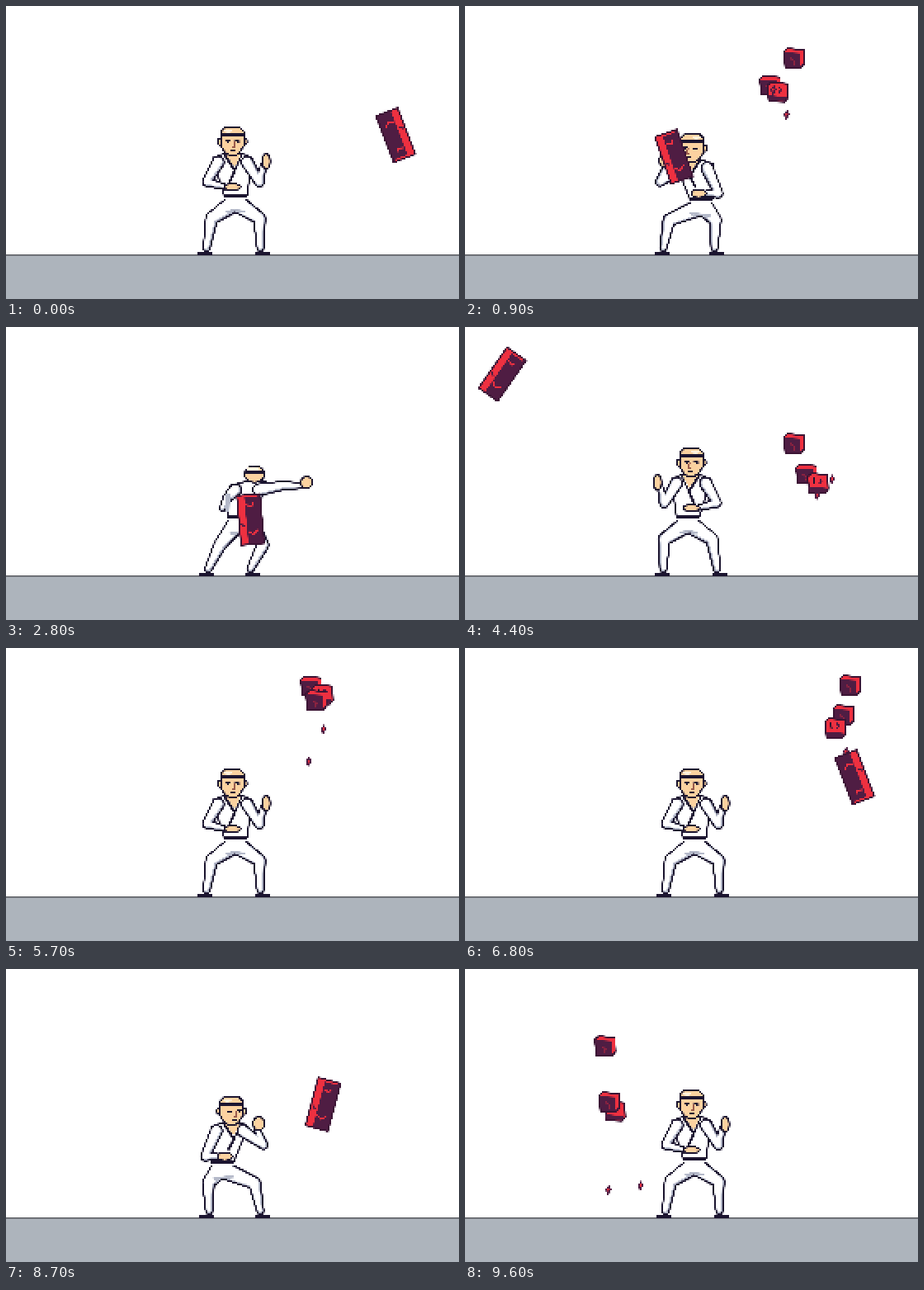
Write an HTML page with a canvas that moves like this. It is 549x355 px and loops after 9.7 s.

```html
<!DOCTYPE html>
<html lang="en">
<head>
<meta charset="utf-8">
<title>Brick breaker</title>
<style>
html, body { margin: 0; width: 100%; height: 100%; overflow: hidden; background: #fff; }
canvas { display: block; width: 549px; height: 355px; }
</style>
</head>
<body>
<canvas id="stage" width="549" height="355"></canvas>
<script>
const INK = '#1c1530', WHITE = '#fff', SKIN = '#fcd2a0', PALE = '#fff3df', SHADE = '#b4b9c9';
const RED = '#ee3040', PLUM = '#4f1d43', EDGE = '#3b1434';
const STEP = 100, STEPS = 97, PIXEL = 2, GRAVITY = 16;

// Shapes are drawn large, then sampled down to hard square pixels.
const stage = document.getElementById('stage').getContext('2d');
const small = new OffscreenCanvas(275, 178).getContext('2d');
const ctx = new OffscreenCanvas(1100, 712).getContext('2d');
stage.imageSmoothingEnabled = small.imageSmoothingEnabled = false;

function trace(points) {
  ctx.beginPath();
  for (let i = 0; i < points.length; i += 2) ctx.lineTo(points[i], points[i + 1]);
}

function line(points, color = INK, width = PIXEL) {
  trace(points);
  ctx.strokeStyle = color;
  ctx.lineWidth = width;
  ctx.stroke();
}

function poly(points, color, edge) {
  trace(points);
  ctx.closePath();
  ctx.fillStyle = color;
  ctx.fill();
  if (!edge) return;
  ctx.strokeStyle = edge;
  ctx.lineWidth = PIXEL;
  ctx.stroke();
}

function oval(x, y, rx, ry, color, edge) {
  ctx.beginPath();
  ctx.ellipse(x, y, rx, ry, 0, 0, 7);
  ctx.fillStyle = color;
  ctx.fill();
  ctx.strokeStyle = edge || color;
  ctx.lineWidth = edge ? PIXEL : 0.1;
  ctx.stroke();
}

function rect(x, y, w, h, color) {
  ctx.fillStyle = color;
  ctx.fillRect(x, y, w, h);
}

// Tapered sleeve or trouser leg through three joints.
function limb(a, b, c, r0, r1) {
  for (const [inset, shift, color] of [[0, 0, INK], [2, 0, SHADE], [2.8, -0.8, WHITE]]) {
    for (let i = 0; i <= 60; i++) {
      const u = i / 60, [from, to] = u < 0.5 ? [a, b] : [b, c], v = u < 0.5 ? u * 2 : u * 2 - 1;
      const r = r0 + (r1 - r0) * u - inset;
      oval(from[0] + (to[0] - from[0]) * v + shift, from[1] + (to[1] - from[1]) * v + shift, r, r, color);
    }
  }
}

// shoulder and waist: left x, right x, y; hands: x, y, radii.
const STAND = {
  head: [274, 164], shoulder: [250, 298, 182], waist: [264, 292, 229],
  elbows: [[243, 213], [307, 214]], hands: [[274, 219, 10, 4], [315, 188, 5, 9]],
  knees: [[249, 257], [307, 257]], feet: [240, 310]
};
const READY = {
  head: [273, 172], turn: 3, shoulder: [248, 293, 189], waist: [248, 276, 233],
  elbows: [[241, 227], [312, 213]], hands: [[265, 227, 9, 5], [306, 187, 7, 8]],
  knees: [[245, 259], [301, 259]], feet: [243, 310]
};
const PUNCH = {
  head: [301, 178], back: true, shoulder: [271, 312, 190], waist: [268, 306, 229],
  elbows: [[268, 207], [335, 192]], hands: [[270, 220, 4, 4], [364, 188, 7, 7]],
  knees: [[259, 264], [311, 264]], feet: [242, 298]
};

function drawHead({ head: [x, y], turn = 0, back }) {
  if (back) {
    oval(x, y, 12, 10, SKIN, INK);
    oval(x - 2, y - 6, 8, 3, PALE);
    rect(x - 12, y - 4, 24, 4, INK);
    return;
  }
  for (const side of [-1, 1]) oval(x + side * 15, y, 3, 4, SKIN, INK);
  poly([-9,-17, 9,-17, 14,-12, 14,5, 9,13, 4,17, -3,17, -9,13, -14,5, -14,-12]
    .map((v, i) => v + (i % 2 ? y : x)), SKIN, INK);
  oval(x - 5, y - 13, 5, 2, PALE);
  rect(x - 14, y - 11, 29, 4, INK);
  for (const side of [-1, 1]) {
    const eye = x + turn + side * 6;
    line([eye - 3, y - 1 - side, eye + 3, y - 1 + side * (turn ? -1 : 1)]);
    rect(eye - 1, y, 2, 2, INK);
  }
  line([x + turn + 2, y, x + turn + 3, y + 6, x + turn, y + 6], '#9a5b4c');
  line([x + turn - 2, y + 11, x + turn + 4, y + 11], INK);
}

function drawMan(pose) {
  const { shoulder: [sl, sr, sy], waist: [wl, wr, wy], elbows, hands, knees, feet, back } = pose;
  const mid = pose.head[0] + 1;
  feet.forEach((x, i) => {
    poly([x - 8, 298, x + 8, 298, x + 8, 301, x - 8, 301], SKIN, INK);
    const hip = [i ? wr - 9 : wl + 9, wy + 12], ankle = [x + (i ? -2 : 3), 293];
    limb(hip, knees[i], ankle, 11, 5);
  });
  poly([wl, wy + 2, wr, wy + 2, wr - 7, wy + 18, wl + 7, wy + 18], WHITE);
  line([wl + 3, wy + 21, mid, wy + 18, wr - 3, wy + 20], SHADE, 3);
  poly([mid - 12, sy - 3, sl, sy + 2, wl, wy, wr, wy, sr, sy + 2, mid + 12, sy - 3], WHITE, INK);
  if (!back) {
    poly([mid - 9, sy - 2, mid + 9, sy - 2, mid + 2, sy + 13], SKIN);
    line([mid - 11, sy - 3, mid + 2, sy + 17, mid - 5, wy - 14], INK, 3);
    line([mid + 11, sy - 3, mid + 2, sy + 17]);
  }
  rect(wl, wy - 1, wr - wl, 4, INK);
  elbows.forEach((elbow, i) => {
    const [x, y, rx, ry] = hands[i];
    limb([i ? sr - 6 : sl + 7, sy + 7], elbow, [x + (i ? -3 : -8), y + (i ? 4 : 0)], 8, 4);
    if (!back || i) oval(x, y, rx, ry, SKIN, INK);
  });
  if (back) line([sl - 2, sy + 12, wl, wy - 6], SHADE, 5);
  drawHead(pose);
}

function at(x, y, degrees, paint) {
  ctx.save();
  ctx.translate(x, y);
  ctx.rotate(degrees * Math.PI / 180);
  paint();
  ctx.restore();
}

function brick() {
  poly([-14, -30, 14, -30, 14, 30, -14, 30], PLUM, EDGE);
  rect(-13, -29, 8, 58, RED);
  rect(-13, -29, 24, 2, RED);
  line([-4, 14, 2, 18, 8, 13], RED);
  line([-4, -18, 3, -16, 5, -20], RED);
  line([-12, 4, -8, 8], PLUM);
}

function chunk(dark) {
  poly([-12, -8, -7, -12, 12, -10, 13, 7, 9, 12, -10, 11], dark ? PLUM : RED, EDGE);
  if (dark) {
    poly([-11, -7, -7, -11, 12, -9, 12, 6, 8, 10, 8, -6], RED);
    line([-4, 0, 1, 4, 0, 8], '#8d2340');
  } else {
    poly([-11, 4, 12, 6, 9, 11, -10, 10], PLUM);
    line([-5, -7, -4, 1]);
    line([2, -6, 5, -3, 2, 1], PLUM);
  }
}

const bit = () => poly([-2, 0, 1, -4, 3, 0, 0, 5], RED, PLUM);

// Each blow: its step, whether the brick comes from the left, and the drift of the pieces.
const BLOWS = [
  [4, 0, 9], [10, 1, 9], [19, 1, 36], [19, 0, 36], [28, 0, 9], [37, 0, 11],
  [49, 1, -40], [53, 0, 9], [64, 0, 20], [72, 0, 8], [80, 0, 40], [89, 0, -10]
];

// n is the number of steps left before the blow.
function drawBrick(n, fromLeft) {
  if (fromLeft) return at(305 - 52 * n, 233 - 54.7 * n + 3.9 * n * n, 35 - 13.5 * (5 - n), brick);
  const t = 4 - n;
  at(296 + 44 * n, 233 - 50 * n + 7.7 * n * n, 159 + 77 * t + 15.5 * t * t, brick);
}

const random = seed => {
  const v = Math.sin(seed * 12.9898) * 43758.5453;
  return v - Math.floor(v);
};

function drawBurst(age, hit, drift) {
  for (let i = 0; i < 5; i++) {
    const solid = i < 3, spread = random(hit * 7 + i) - 0.5, lift = random(hit * 11 + i) - 0.5;
    const vx = drift + spread * 7, vy = (solid ? -62 : -52) + lift * 16;
    const x = 300 + drift * 4 + vx * age, y = 190 + vy * age + GRAVITY / 2 * age * age;
    at(Math.round(x), Math.round(y), 0, solid ? () => chunk(i % 2 === 0) : bit);
  }
}

function draw(k) {
  ctx.setTransform(1, 0, 0, 1, 0, 0);
  ctx.clearRect(0, 0, 1100, 712);
  ctx.scale(2, 2);

  const striking = BLOWS.find(([hit]) => k >= hit && k < hit + 4);
  const next = BLOWS.find(([hit]) => hit > k) || BLOWS[0];
  const wait = next[0] - k;
  const pose = striking ? PUNCH : wait > 0 && wait < 4 ? READY : STAND;
  // A blow from both sides is met facing right.
  const target = striking || next;
  const both = BLOWS.some(b => b[0] === target[0] && !b[1]);
  ctx.save();
  if (target[1] && !both) {
    ctx.translate(548, 0);
    ctx.scale(-1, 1);
  }
  drawMan(pose);
  ctx.restore();

  for (const [hit, fromLeft, drift] of BLOWS) {
    const n = hit - k;
    if (n >= 0 && n < 7) drawBrick(n, fromLeft);
    if (n < 0 && n > -15 && !(fromLeft && hit === 19)) drawBurst(-n, hit, drift);
  }

  small.clearRect(0, 0, 275, 178);
  small.drawImage(ctx.canvas, 0, 0, 275, 178);
  stage.fillStyle = WHITE;
  stage.fillRect(0, 0, 549, 355);
  stage.fillStyle = '#55565c';
  stage.fillRect(0, 301, 549, 2);
  stage.fillStyle = '#adb4bc';
  stage.fillRect(0, 302.5, 549, 53);
  stage.drawImage(small.canvas, 0, 0, 550, 356);
}

const start = performance.now();
let shown = -1;
function tick() {
  const k = Math.floor((performance.now() - start) / STEP) % STEPS;
  if (k !== shown) draw(shown = k);
  requestAnimationFrame(tick);
}
tick();
</script>
</body>
</html>
```
